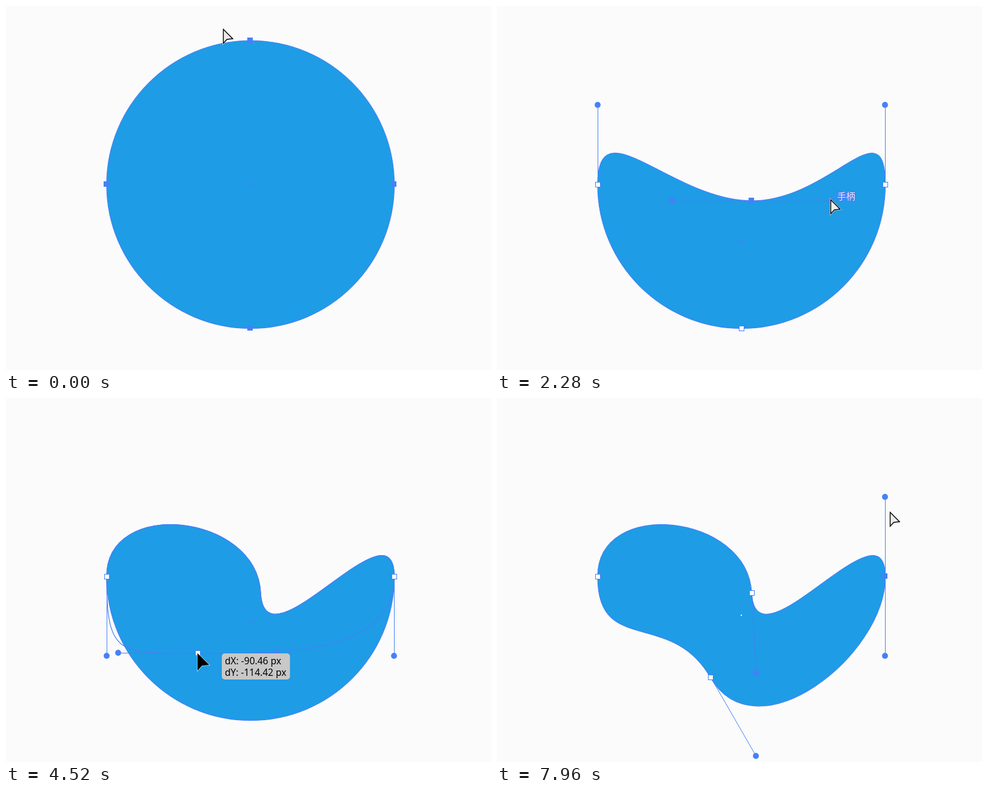
Recreate the animation shown at these times as an HTML page with a canvas. Size 800 px wide and 600 px high, loop 8 s.

```html
<!DOCTYPE html>
<html lang="zh">
<head>
<meta charset="utf-8">
<style>
html, body { margin: 0; height: 100%; overflow: hidden; background: #fbfbfb; }
canvas { display: block; }
</style>
</head>
<body>
<canvas id="stage" width="800" height="600"></canvas>
<script>
const c = document.getElementById('stage').getContext('2d');
const LOOP = 8000, STEP = 40, ARM = 131, UNIT = 1.034;
const FILL = '#1e9ce5', LINE = '#4680f8', PAPER = '#fbfbfb';
const vertical = (x, y) => ({ at: [x, y], up: [x, y - ARM], down: [x, y + ARM] });
const L = vertical(166, 294.5), R = vertical(640.5, 294.5);
const TOP = [403.5, 57], BOTTOM = [403.5, 531.5];

// Drags visit their points at equal intervals; stops let the pointer rest.
const stop = (from, to, x, y, hint) => ({ from, to, points: [[x, y]], hint });
const drag = (from, to, node, part, ...points) => ({ from, to, node, part, points });
const script = [
  stop(0, 0, 358, 38),
  drag(600, 2040, 'T', 'at', TOP, [401, 10], [397.17, 290], [408, 3], [420, 321]),
  stop(2280, 2440, 550, 319, '手柄'),
  drag(2440, 3840, 'T', 'out', [551, 321], [600, 190], [432, 563], [427, 453]),
  stop(3960, 4120, 400, 528, '路径'),
  drag(4160, 4880, 'B', 'at', BOTTOM, [316.015, 420.84], [334, 450]),
  drag(5240, 6200, 'B', 'out', [465, 450], [413, 569], [409, 580]),
  drag(6440, 6680, 'B', 'at', [334, 450], [352, 460.5]),
  stop(6800, 6960, 624, 225),
  stop(7160, 7160, 697, 262),
  stop(7360, 7480, 641, 294),
  stop(7760, 7760, 627, 269),
  stop(7960, 8000, 648, 188)
];

function glide(points, u) {
  const n = points.length - 1, s = Math.max(0, Math.min(1, u)) * n;
  const i = Math.max(0, Math.min(n - 1, Math.floor(s))), f = s - i;
  const a = points[i], b = points[Math.min(n, i + 1)], e = f * f * (3 - 2 * f);
  return [a[0] + (b[0] - a[0]) * e, a[1] + (b[1] - a[1]) * e];
}

const progress = (g, t) => (t - g.from) / (g.to - g.from || 1);

function pointerAt(t) {
  const next = script.findIndex(g => g.to >= t), g = script[next], last = script[next - 1];
  if (t >= g.from) return glide(g.points, progress(g, t));
  return glide([last.points.at(-1), g.points[0]], (t - last.to) / (g.from - last.to));
}

// The dragged arm is free; the opposite one keeps its length.
function makeNode({ at: [x, y], out: [dx, dy] }) {
  const k = ARM / Math.hypot(dx, dy);
  return { at: [x, y], out: [x + dx, y + dy], back: [x - dx * k, y - dy * k] };
}

function shapeAt(t) {
  const s = { T: { at: TOP, out: [ARM, 0] }, B: { at: BOTTOM, out: [ARM, 0] } };
  for (const g of script) {
    if (!g.node || g.from > t) continue;
    const p = glide(g.points, progress(g, t)), node = s[g.node];
    node[g.part] = g.part === 'at' ? p : [p[0] - node.at[0], p[1] - node.at[1]];
  }
  return { T: makeNode(s.T), B: makeNode(s.B), L, R };
}

const curves = ({ T, B, L, R }) => [
  [L.at, L.up, T.back, T.at], [T.at, T.out, R.up, R.at],
  [R.at, R.down, B.out, B.at], [B.at, B.back, L.down, L.at]
];

function trace(shape) {
  c.beginPath();
  c.moveTo(...shape.L.at);
  curves(shape).forEach(([, p, q, r]) => c.bezierCurveTo(...p, ...q, ...r));
  c.closePath();
}

function middle(shape) {
  const ys = [];
  for (const [a, p, q, b] of curves(shape)) {
    for (let u = 0; u <= 1; u += 0.04) {
      const v = 1 - u;
      ys.push(v ** 3 * a[1] + 3 * v * v * u * p[1] + 3 * v * u * u * q[1] + u ** 3 * b[1]);
    }
  }
  return Math.round((Math.min(...ys) + Math.max(...ys)) / 2);
}

function dot(x, y, r, color) {
  c.fillStyle = color;
  c.beginPath();
  c.arc(x, y, r, 0, 7);
  c.fill();
}

function handle(from, to) {
  const [x, y] = to.map(Math.floor);
  c.beginPath();
  c.moveTo(...from.map(v => Math.floor(v) + 0.5));
  c.lineTo(x + 0.5, y + 0.5);
  c.stroke();
  dot(x, y, 4.9, LINE);
}

function anchor(at, solid) {
  const [x, y] = at.map(Math.floor);
  c.fillStyle = solid ? LINE : '#fff';
  if (solid) return c.fillRect(x - 5, y - 5, 9, 9);
  c.fillRect(x - 4, y - 4, 9, 9);
  c.strokeRect(x - 3.5, y - 3.5, 8, 8);
}

function arrow(x, y, dark) {
  c.save();
  c.translate(x + 0.5, y + (dark ? 1.5 : 0.5));
  if (dark) c.scale(1.1, 1.1);
  c.beginPath();
  [[0, 0], [0, 23], [6, 16.5], [15.5, 15.5]].forEach(p => c.lineTo(...p));
  c.closePath();
  c.lineWidth = 2.4;
  c.strokeStyle = '#fff';
  c.stroke();
  c.fillStyle = dark ? '#000' : '#ebebeb';
  c.fill();
  c.lineWidth = 1.4;
  c.strokeStyle = '#000';
  c.stroke();
  c.restore();
}

function tooltip(at, start) {
  const rows = ['X', 'Y'].map((axis, i) => `d${axis}: ${((at[i] - start[i]) * UNIT).toFixed(2)} px`);
  c.font = '15.5px "Noto Sans", "Open Sans", sans-serif';
  const w = Math.max(...rows.map(r => c.measureText(r).width)) + 11;
  const x = Math.round(at[0] + 39.5), y = Math.round(at[1]);
  c.fillStyle = '#c8c8c8';
  c.beginPath();
  c.roundRect(x, y, w, 43, 5);
  c.fill();
  c.fillStyle = '#000';
  rows.forEach((r, i) => c.fillText(r, x + 5, y + 18 + i * 19));
}

function label(text, x, y) {
  c.font = '15px "Noto Sans CJK SC", "Noto Sans CJK", sans-serif';
  c.lineWidth = 3;
  c.strokeText(text, x, y);
  c.fillStyle = '#e6e2f8';
  c.fillText(text, x, y);
}

function draw(t) {
  const now = script.find(g => t >= g.from && t < g.to) || {};
  const held = now.node, moving = now.part === 'at';
  const live = shapeAt(t), fixed = held ? shapeAt(now.from) : live;
  const picked = t < 600 ? '' : t < 4040 ? 'T' : t < 7400 ? 'B' : 'R';
  const { T, B } = live;

  c.fillStyle = PAPER;
  c.fillRect(0, 0, 800, 600);
  c.lineWidth = 1.2;
  c.strokeStyle = LINE;
  c.fillStyle = FILL;
  trace(fixed);
  c.fill();
  if (!held || moving) {
    c.stroke();
    const size = picked === 'R' ? 2 : 4;
    c.fillStyle = picked === 'R' ? '#fff' : LINE;
    c.fillRect(403 - size / 2, middle(fixed) - size / 2, size, size);
  }
  if (held) {
    trace(live);
    c.stroke();
  }

  c.lineWidth = 1;
  const arms = {
    T: [[L, 'up'], [R, 'up'], [T, 'back'], [T, 'out']],
    B: [[L, 'down'], [R, 'down'], [B, 'back'], [B, 'out']],
    R: [[R, 'up'], [R, 'down'], [T, 'out'], [B, 'out']]
  }[picked] || [];
  arms.forEach(([node, side]) => handle(node.at, node[side]));
  for (const n of held ? ['L', 'R', held] : ['L', 'R', 'T', 'B']) {
    anchor(live[n].at, !held && (!picked || n === picked));
  }

  const [x, y] = pointerAt(t);
  if (now.hint) {
    if (picked === 'B') dot(x, y - 0.5, 8, '#a9adb2');
    label(now.hint, x + 11, y);
  }
  if (moving) tooltip([x, y], fixed[held].at);
  arrow(x, y, held);
}

function frame() {
  draw(Math.floor(performance.now() % LOOP / STEP) * STEP);
  requestAnimationFrame(frame);
}
frame();
</script>
</body>
</html>
```
